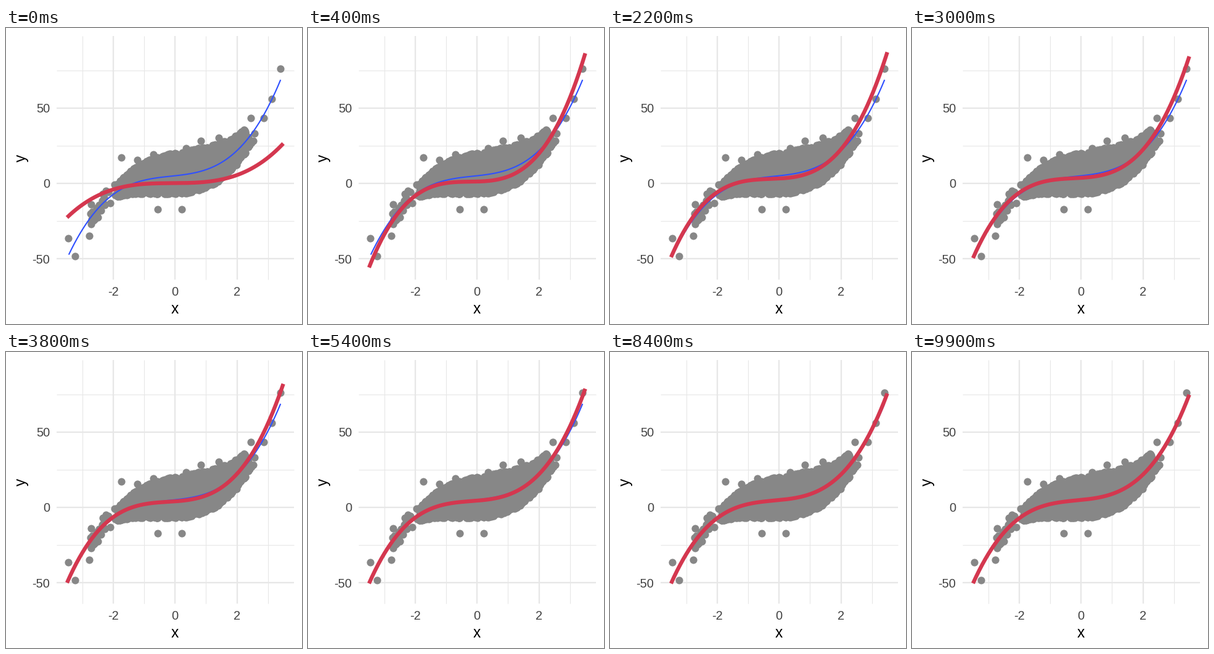
Write a matplotlib script that moves like this. It is 480 px wide and 480 px high and loops after 10 s.

```python
import numpy as np
import matplotlib.pyplot as plt
from matplotlib.animation import FuncAnimation

SIZE, DPI = 480, 72
FRAMES, STEP_MS = 100, 100
LEFT, RIGHT, TOP, BOTTOM = 82, 467, 13, 408
GREY, BLUE, RED, GRID, INK = "#878787", "#2f50ff", "#d4374f", "#e7e7e7", "#424242"
FIT = (5.0, 2.25, 0.54, 1.25)

plt.rcParams["font.family"] = "Liberation Sans"
rng = np.random.default_rng(7)


def px(x):
    return 274.3 + 50.1 * np.asarray(x)


def py(y):
    return 251.8 - 2.444 * np.asarray(y)


def cubic(coef, x):
    a, b, c, d = coef
    return a + b * x + c * x**2 + d * x**3


def descend(u, v, r, slow_rate, fast_rate, k):
    """Coefficient pair after k gradient steps from zero.

    The error decays along a slow mode (1, -r) and a fast mode (1, 1/r).
    """
    fast = (v + r * u) / (r + 1 / r)
    slow = (u - fast) * slow_rate**k
    fast *= fast_rate**k
    return u - slow - fast, v + r * slow - fast / r


def coefs(frame):
    k = 1 + 3 * frame
    a, c = descend(FIT[0], FIT[2], 0.414, 0.9883, 0.928, k)
    b, d = descend(FIT[1], FIT[3], 0.217, 0.9923, 0.66, k)
    return a, b, c, d


def band(lo, hi, n, below, above):
    """n random points around the fit, between the two residual bounds."""
    x = rng.uniform(lo, hi, n)
    low, high = -below(x), above(x)
    return x, cubic(FIT, x) + low + (high - low) * rng.random(n)


def cloud():
    core = band(-1.88, 2.28, 2200,
                lambda x: 12.6 - 1.6 * (x - 0.5)**2,
                lambda x: 16.0 - 2.1 * (x - 0.4)**2)
    left = band(-2.75, -1.9, 26, lambda x: 6 + 0 * x, lambda x: 7 + 0 * x)
    right = band(2.25, 2.56, 6, lambda x: 9 + 0 * x, lambda x: 1 + 0 * x)
    strays = np.transpose([
        (-3.45, -36.4), (-3.24, -48.2), (-2.78, -34.8), (-2.73, -13.8),
        (-1.75, 17.1), (-1.23, 15.5), (-0.71, 19.2), (-0.56, -17.3),
        (0.22, -17.4), (0.35, 23.2), (0.83, 28.0), (1.41, 30.1),
        (2.45, 43.4), (2.56, 33.0), (2.87, 43.2), (3.12, 56.1), (3.41, 75.9),
    ])
    return np.hstack([core, left, right, strays])


fig = plt.figure(figsize=(SIZE / DPI, SIZE / DPI), dpi=DPI, facecolor="white")
ax = fig.add_axes([0, 0, 1, 1])
ax.set_xlim(0, SIZE)
ax.set_ylim(SIZE, 0)
ax.axis("off")


def grid(xs, ys, width):
    ax.vlines(px(xs), TOP, BOTTOM, color=GRID, lw=width, zorder=1)
    ax.hlines(py(ys), LEFT, RIGHT, color=GRID, lw=width, zorder=1)


def label(x, y, text, size=20, color=INK, **kw):
    style = {"ha": "center", "va": "baseline", **kw}
    ax.text(x, y, text, size=size, color=color, **style)


grid([-3, -1, 1, 3], [-25, 25, 75], 1.15)
grid([-2, 0, 2], [-50, 0, 50], 2.3)

for v in (-2, 0, 2):
    label(px(v), 434, str(v))
for v in (-50, 0, 50):
    label(71, py(v) + 7.5, str(v), ha="right")
label(274.1, 463, "x", 24.5, "black")
label(24.5, 210.5, "y", 24.5, "black", va="center", rotation=90)

dot_x, dot_y = cloud()
ax.plot(px(dot_x), py(dot_y), "o", ms=12.2, mew=0, color=GREY, zorder=2, snap=False)

xb = np.linspace(-3.443, 3.413, 80)
ax.plot(px(xb), py(cubic(FIT, xb)), color=BLUE, lw=2.1, zorder=3, solid_capstyle="butt")

xr = np.linspace(-3.5, 3.5, 141)
curve, = ax.plot([], [], color=RED, lw=6.3, zorder=4, solid_capstyle="butt")


def update(frame):
    curve.set_data(px(xr), py(cubic(coefs(frame), xr)))
    return (curve,)


anim = FuncAnimation(fig, update, frames=FRAMES, interval=STEP_MS,
                     repeat=True, repeat_delay=0)
plt.show()
```
